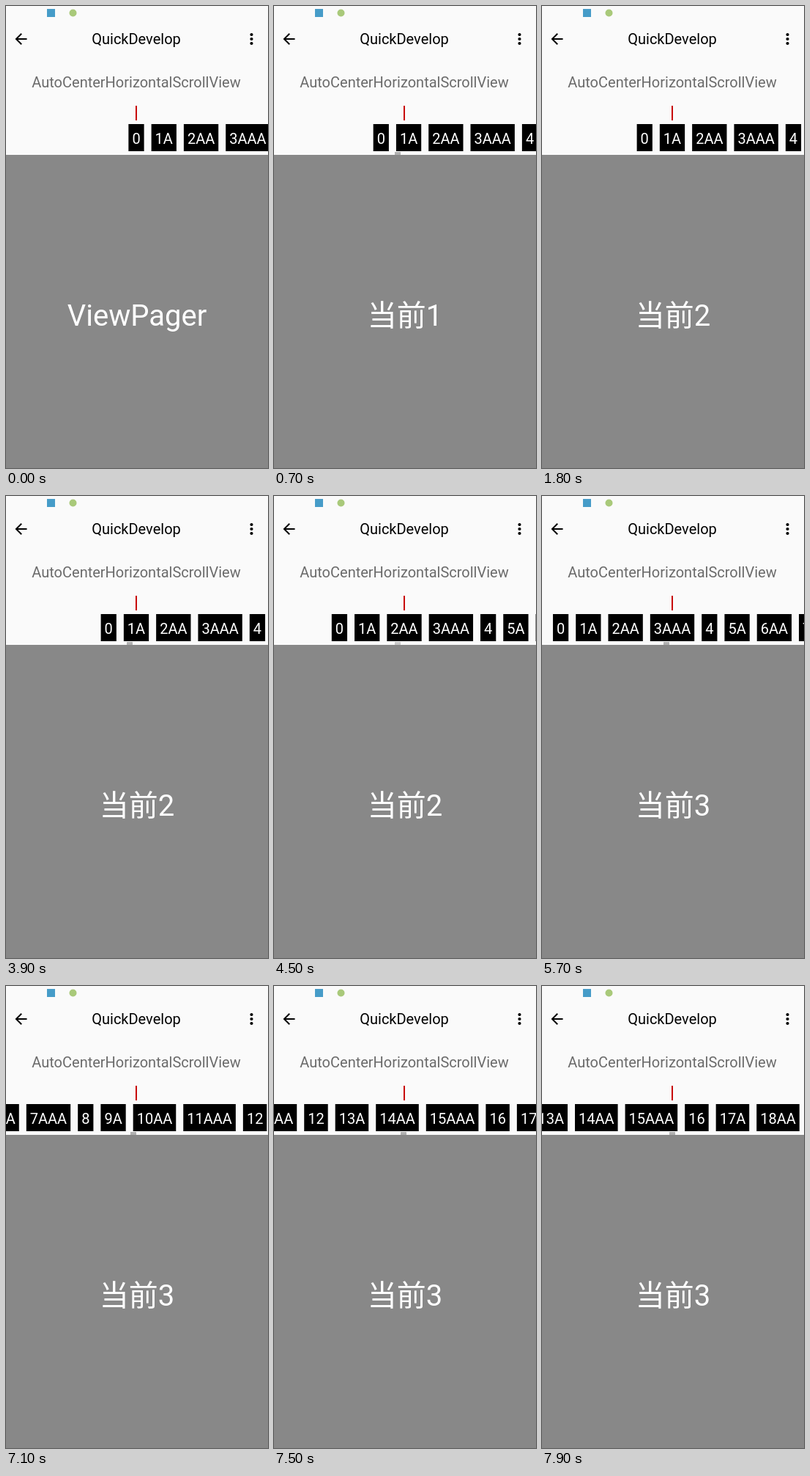
Recreate the animation shown at these times as an HTML page with a canvas. Size 358 by 630 pixels, loop 8 s.

```html
<!DOCTYPE html>
<html lang="zh-CN">
<head>
<meta charset="utf-8">
<style>
  html, body { margin: 0; height: 100%; overflow: hidden; background: #fafafa; }
  canvas { display: block; }
</style>
</head>
<body>
<canvas width="358" height="630"></canvas>
<script>
const ctx = document.querySelector('canvas').getContext('2d');
const LOOP = 8000, STEP = 100;
const CENTER = 178, GAP = 10, PAD = 5;
const BACK_ARROW = new Path2D('M28.5 44H16.3l5.6-5.6L20.5 37l-8 8 8 8 1.4-1.4L16.3 46h12.2z');

function setFont(size) {
  ctx.font = `${size}px Roboto, "Noto Sans CJK SC", "Noto Sans CJK", sans-serif`;
}

function text(str, x, y, size, color, align = 'center') {
  setFont(size);
  ctx.textAlign = align;
  ctx.fillStyle = color;
  ctx.fillText(str, x, y);
}

function rect(x, y, w, h, color) {
  ctx.fillStyle = color;
  ctx.fillRect(x, y, w, h);
}

function dot(x, y, r, color) {
  ctx.fillStyle = color;
  ctx.beginPath();
  ctx.arc(x, y, r, 0, 7);
  ctx.fill();
}

// Labels run 0, 1A, 2AA, 3AAA, 4, 5A, ...
setFont(20);
let edge = 0;
const items = Array.from({ length: 21 }, (_, i) => {
  const label = i + 'A'.repeat(i % 4);
  const width = ctx.measureText(label).width + 2 * PAD;
  const item = { label, width, left: edge };
  edge += width + GAP;
  return item;
});
const origin = CENTER - items[0].width / 2;
const centered = i => items[i].left + (items[i].width - items[0].width) / 2;

// start, end, from, to, ease-out power
const moves = [
  [400, 900, 0, centered(1), 2],
  [3900, 4200, centered(1), centered(2), 3],
  [5300, 5700, 169.6, centered(3), 2],
  [6700, 6800, centered(3), 210, 1],
  [6900, 7100, 210, 475.7, 1],
  [7100, 7900, 475.7, 852.6, 2],
];

function scrollAt(t) {
  const move = moves.findLast(m => t >= m[0]);
  if (!move) return 0;
  const [start, end, from, to, power] = move;
  const p = Math.min(1, (t - start) / (end - start));
  return from + (to - from) * (1 - (1 - p) ** power);
}

// shown at, fade start, fade end
const thumbSpans = [[500, 1100, 1400], [3900, 4400, 4700], [5300, 6200, 6400], [6800, 8000, 8100]];

function thumbAlpha(t) {
  const span = thumbSpans.find(([on, , off]) => t >= on && t < off);
  return span ? Math.min(1, (span[2] - t) / (span[2] - span[1])) : 0;
}

function pageLabel(t) {
  if (t < 700) return 'ViewPager';
  return '当前' + (t < 1800 ? 1 : t < 5500 ? 2 : 3);
}

function draw(t) {
  const scroll = scrollAt(t);
  rect(0, 0, 358, 630, '#fafafa');

  rect(56, 4, 11, 11, '#469cc8');
  dot(91.5, 9.5, 5, '#a9c97a');

  ctx.fillStyle = '#000';
  ctx.fill(BACK_ARROW);
  for (const y of [39, 45, 51]) dot(335.5, y, 2.1, '#000');
  text('QuickDevelop', CENTER, 52, 20, '#000');
  text('AutoCenterHorizontalScrollView', CENTER, 110.5, 20, '#6b6b6b');
  rect(177, 136, 2, 20, '#c80000');

  for (const { label, width, left } of items) {
    const x = origin + left - scroll;
    if (x > 358 || x + width < 0) continue;
    rect(x, 161, width, 37, '#000');
    text(label, x + PAD, 187.5, 20, '#fff', 'left');
  }

  ctx.globalAlpha = thumbAlpha(t);
  rect(Math.floor(164.8 + scroll * 0.0111), 199, 8, 4, '#b0b0b0');
  ctx.globalAlpha = 1;

  rect(0, 203, 358, 427, '#888');
  text(pageLabel(t), 179, 436, 40, '#fff');
}

function frame() {
  const t = performance.now() % LOOP;
  draw(Math.floor(t / STEP) * STEP);
  requestAnimationFrame(frame);
}
frame();
</script>
</body>
</html>
```
